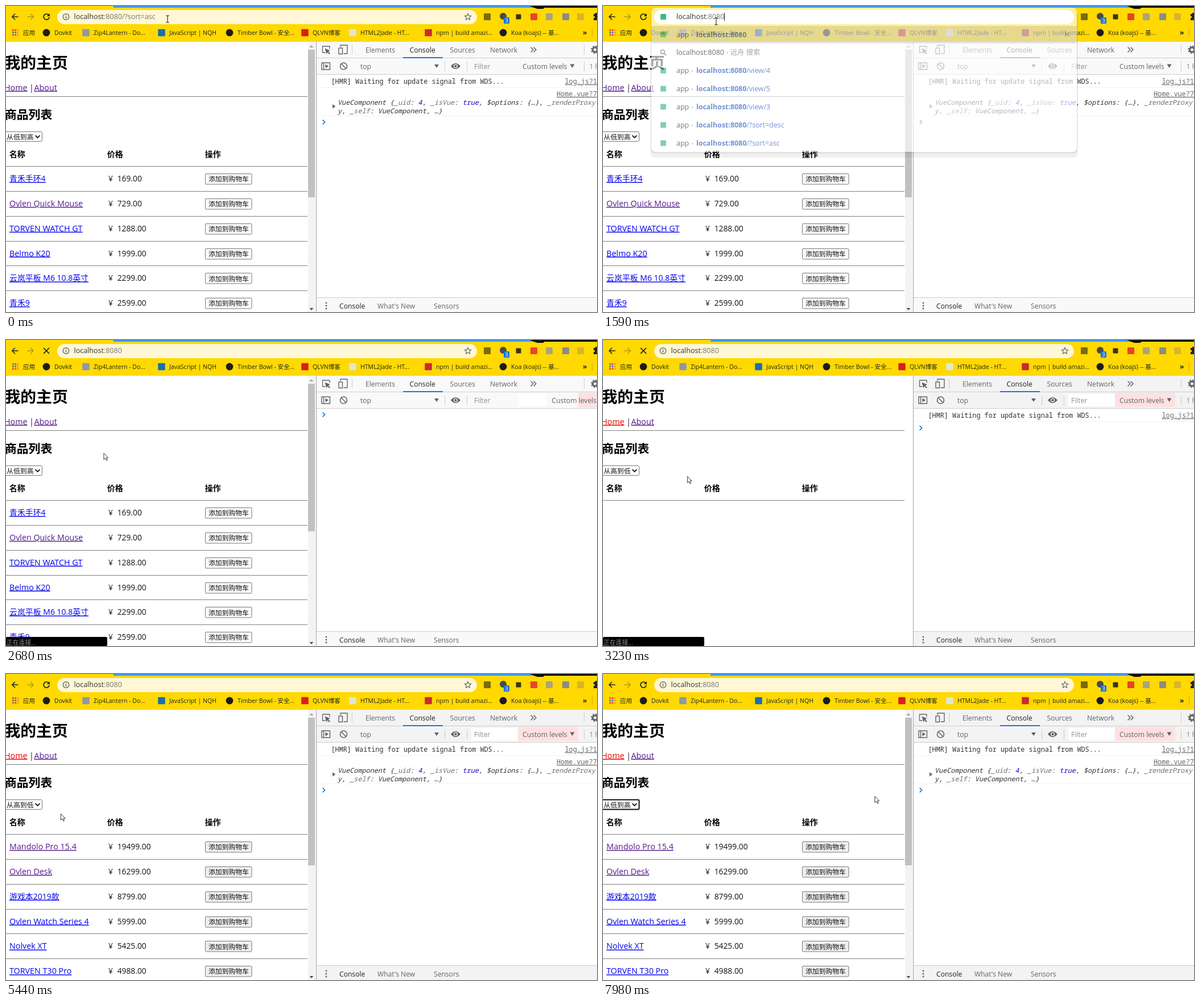
Recreate the animation shown at these times as an HTML page. Size 1039x539 px, loop 8000 ms.

```html
<!DOCTYPE html>
<html lang="zh-CN">
<head>
<meta charset="utf-8">
<title>商品列表</title>
<style>
html, body { margin: 0; width: 100%; height: 100%; overflow: hidden; background: #fff; }
svg { display: block; width: 1039px; height: 539px; }
text { font-family: "Open Sans", "Noto Sans CJK SC", "Noto Sans CJK JP", sans-serif; white-space: pre; }
.mono { font-family: "Noto Sans Mono", "DejaVu Sans Mono", monospace; }
.link { text-decoration: underline; }
.bold { font-weight: 700; }
.ital { font-style: italic; }
.line { fill: none; stroke-linecap: round; stroke-linejoin: round; }
</style>
</head>
<body>
<svg id="stage" viewBox="0 0 1039 539" xmlns="http://www.w3.org/2000/svg"></svg>
<script>
const LOOP = 8000;
const BLUE = '#0000ee', VISITED = '#551a8b', GREY = '#5f6368', ACCENT = '#1a73e8';
const RULE = '#808080', YELLOW = '#ffd900', PALE = '#fff7d6', ROW = 43.85;

const text = (x, y, size, fill, str, cls = '', id = '') =>
  `<text x="${x}" y="${y}" font-size="${size}" fill="${fill}" class="${cls}" id="${id}">${str}</text>`;
const rect = (x, y, w, h, fill, more = '') =>
  `<rect x="${x}" y="${y}" width="${w}" height="${h}" fill="${fill}" ${more}/>`;
const dot = (x, y, r, fill, more = '') => `<circle cx="${x}" cy="${y}" r="${r}" fill="${fill}" ${more}/>`;
const line = (d, stroke, w = 1, more = '') =>
  `<path class="line" d="${d}" stroke="${stroke}" stroke-width="${w}" ${more}/>`;
const shape = (d, fill, more = '') => `<path d="${d}" fill="${fill}" ${more}/>`;
const group = (id, body, more = '') => `<g id="${id}" ${more}>${body}</g>`;
const span = (fill, str, cls = '') => `<tspan fill="${fill}" class="${cls}">${str}</tspan>`;
const square = (x, y, s, fill) => rect(x - s / 2, y - s / 2, s, s, fill, 'rx="1"');

function toolbar() {
  let s = rect(0, 0, 1039, 63, YELLOW) + rect(189, 0, 850, 3, '#0c0c10') + rect(189, 0, 740, 3, '#3f9af0')
    + shape('M921 0H946V3Q946 5 942 5H934Q928 3 921 0Z', '#0c0c10');
  s += line('M21 19H11M15.5 14.3L10.8 19L15.5 23.7', '#222', 1.6);
  s += line('M38 19H48M43.5 14.3L48.2 19L43.5 23.7', '#b39a1c', 1.6);
  s += group('reload', line('M75 15.8A5 5 0 1 0 76 20.2', '#222', 1.7) + shape('M76.8 13V18H71.8Z', '#222'));
  s += group('stop', line('M66.6 14.5L75.4 23.3M75.4 14.5L66.6 23.3', '#222', 1.7));

  const icons = [[846, '#7b6a10'], [928, '#e8432e'], [955, '#a9a47e'], [984, '#8c8c84'], [1010, '#d8b52c']];
  s += icons.map(([x, c]) => square(x, 19, 12, c)).join('');
  s += dot(874, 18, 6, '#4a4a4a') + rect(875, 20, 10, 11, '#1b78d0', 'rx="1.5"') + text(877.4, 29, 9, '#fff', '3');
  s += square(901, 19, 9, '#3a3512');
  s += shape('M1033 14H1036V12H1039V25H1033V21H1035V18H1033Z', '#222');

  for (let i = 0; i < 9; i++)
    s += rect(11 + i % 3 * 4.2, 41 + (i / 3 | 0) * 4.2, 2.9, 2.9, ['#e8453c', '#e8453c', '#f39b1f', '#2f9c58', '#3c7fe0', '#f39b1f'][i % 6]);
  const marks = [
    [85, 'Dovkit', '#1c1c1c', 1], [154, 'Zip4Lantern - Do...', '#8f98a3'],
    [287, 'JavaScript | NQH', '#1a6fb0'], [407, 'Timber Bowl - 安全...', '#1c1c1c', 1],
    [539, 'QLVN博客', '#d81e1e'], [623, 'HTML2Jade - HT...', '#dfe7d2'],
    [756, 'npm | build amazi...', '#cb2a32'], [888, 'Koa (koajs) -- 基...', '#1c1c1c', 1]];
  s += text(30, 51, 10.5, '#222', '应用');
  for (const [x, label, c, round] of marks)
    s += (round ? dot(x - 14, 47, 6.4, c) : square(x - 13.5, 47, 12.5, c)) + text(x, 51, 10.55, '#222', label);
  return s + text(1014, 50.5, 12, '#222', '»', 'bold') + rect(1030, 40, 1, 14, '#c9aa08');
}

const table = (id, rows) => group(id, rows.map(([name, price, seen, size = 14.3], i) => {
  const y = 309 + i * ROW, top = Math.round(y) - 13.5;
  return text(6, y, size, seen ? VISITED : BLUE, name, 'link') + text(180, y, 13.8, '#111', '¥')
    + text(195.7, y, 13.8, '#111', price)
    + rect(350.5, top, 81.5, 18.5, id == 'asc' ? '#fafafa' : '#efefef', 'rx="1.5" stroke="#777"')
    + text(356, y + .2, 11.8, '#111', '添加到购物车')
    + (i ? rect(0, Math.round(282 + i * ROW), 530, 1, RULE) : '');
}).join(''));

function page() {
  const head = text(-2.5, 110, 27.8, '#000', '我的主页', 'bold')
    + text(-3, 148.5, 14.3, VISITED, 'Home', 'link', 'home') + text(41, 148.5, 14.3, '#222', '|')
    + text(49.5, 148.5, 14.3, VISITED, 'About', 'link') + rect(0, 159, 530, 1, RULE)
    + text(-2, 198.5, 20.8, '#000', '商品列表', 'bold')
    + rect(-6, 221.5, 69.5, 17, '#fff', 'id="box" rx="2"')
    + text(1, 234.5, 11.9, '#111', '', '', 'choice') + line('M52 228.5L55.5 232L59 228.5', '#222', 1.8)
    + ['名称', '价格', '操作'].map((h, i) => text(5.8 + 172 * i, 266, 14, '#000', h, 'bold')).join('')
    + rect(0, 282, 530, 1, RULE);
  const bar = rect(531, 63, 13, 476, '#f3f3f3') + rect(531, 77, 12, 260, '#c1c1c1')
    + shape('M533.5 73L537 69L540.5 73Z', '#a3a3a3') + shape('M533.5 532L537 536L540.5 532Z', '#505050');
  return group('head', head) + group('list', bar
    + table('asc', [['青禾手环4', '169.00', 0, 13.9], ['Ovlen Quick Mouse', '729.00', 1],
      ['TORVEN WATCH GT', '1288.00'], ['Belmo K20', '1999.00'],
      ['云岚平板 M6 10.8英寸', '2299.00', 0, 13.95], ['青禾9', '2599.00', 0, 13.9]])
    + table('desc', [['Mandolo Pro 15.4', '19499.00', 1], ['Ovlen Desk', '16299.00', 1],
      ['游戏本2019款', '8799.00', 0, 13.95], ['Ovlen Watch Series 4', '5999.00'],
      ['Nolvek XT', '5425.00'], ['TORVEN T30 Pro', '4988.00']]));
}

function devtools() {
  let s = rect(545, 63, 494, 476, '#fff') + rect(546, 63, 493, 57, '#f3f3f3', 'id="bars"')
    + rect(546, 514, 493, 25, '#f3f3f3', 'id="drawer"')
    + rect(545, 63, 1, 476, '#a0a0a0') + rect(546, 91, 493, 1, '#ccc') + rect(546, 120, 493, 1, '#ccc')
    + rect(546, 513, 493, 1, '#ccc');
  s += line('M561 82H556.5V71H569V75', GREY, 1.3) + shape('M560.5 74.5L570 78.5L566.5 80L570 83.5L568.5 85L565 81.5L563.5 85Z', GREY);
  s += line('M588 71.5V69H600V84H594', GREY, 1.4) + line('M585 74H591.5V84.5H585Z', GREY, 1.4);
  s += rect(608, 68, 1, 17, '#ccc') + rect(1016, 68, 1, 17, '#ccc');
  [[632, 'Elements'], [709.5, 'Console'], [780.5, 'Sources'], [851, 'Network']]
    .forEach(([x, str]) => s += text(x, 81.5, 12.1, x == 709.5 ? '#222' : GREY, str));
  s += rect(698, 90, 70, 2, ACCENT) + line('M923 73L927 77L923 81M928 73L932 77L928 81', GREY, 1.6);
  s += dot(1035.5, 77, 4, 'none', `stroke="${GREY}" stroke-width="3"`)
    + dot(1035.5, 77, 6.3, 'none', `stroke="${GREY}" stroke-width="2" stroke-dasharray="2.5 2.45"`);
  s += line('M555 100H569.5V112H555ZM558.5 100V112', GREY, 1.4) + shape('M561.5 102.5L567 106L561.5 109.5Z', GREY);
  s += dot(593.5, 106, 6, 'none', `stroke="${GREY}" stroke-width="1.6"`) + line('M589.3 101.8L597.7 110.2', GREY, 1.6);
  s += text(623, 110.5, 12.1, GREY, 'top') + shape('M753 103H761L757 109Z', GREY);
  s += rect(771, 98, 1, 17, '#ccc') + rect(810, 98, 1, 17, '#ccc');
  s += shape('M782 106Q790 96 799 106Q790 116 782 106Z', GREY) + dot(790.5, 106, 3.6, '#f3f3f3') + dot(790.5, 106, 2.2, GREY);
  s += group('field', rect(818, 95, 81, 22, '#fff')) + text(823, 110.5, 12.1, '#8a8d91', 'Filter');
  s += group('levels', rect(901, 93, 105, 25, '#fde1e0', 'id="pink"') + text(908, 110.5, 12.2, GREY, 'Custom levels')
    + shape('M991.5 102.5H999.5L995.5 109Z', GREY));
  s += group('hidden', rect(1016, 98, 1, 17, '#ccc') + text(1025.5, 110.5, 12.1, '#888', '1 hidden'));
  s += group('hint', rect(902, 95, 48, 22, '#fff') + rect(1006, 93, 33, 26, '#fde1e0') + text(959.5, 110.5, 12.2, GREY, 'Custom levels'));
  s += [523, 528, 533].map(y => dot(563, y, 1.4, GREY)).join('');
  [[586, 'Console', '#222'], [653, "What's New", GREY], [752, 'Sensors', GREY]]
    .forEach(([x, str, c]) => s += text(x, 532.5, 12.1, c, str));

  const key = str => span('#6e6e6e', str);
  const num = str => span('#1c00cf', str);
  s += group('log1', text(571.5, 137, 11.8, '#303030', '[HMR] Waiting for update signal from WDS...', 'mono')
    + text(982.5, 137, 11.8, '#666', 'log.js?1afd', 'mono link') + rect(546, 143, 493, 1, '#f2f2f2'));
  s += group('log2', text(968, 159, 11.8, '#666', 'Home.vue?76f2', 'mono link')
    + shape('M574 173L579.5 176.8L574 180.6Z', '#6e6e6e')
    + text(583, 174, 11.8, '#303030', 'VueComponent {' + key('_uid') + ': ' + num('4') + ', ' + key('_isVue') + ': '
      + num('true') + ', $options: {…}, ' + key('_renderProxy'), 'mono ital')
    + text(583, 188.5, 11.8, '#303030', 'y, ' + key('_self') + ': VueComponent, …}', 'mono ital')
    + rect(546, 193, 493, 1, '#f2f2f2'));
  return s + group('prompt', line('M557.2 -3.4L560.6 0L557.2 3.4', ACCENT, 1.7));
}

function popup() {
  const y = i => 54.5 + 31.9 * i;
  let s = rect(83, 9, 752, 258, '#000', 'rx="9" opacity=".09"') + rect(84, 5, 750, 255, '#000', 'rx="8" opacity=".1"')
    + rect(85, 3, 748, 254, '#fff', 'rx="8"') + rect(85, 35, 748, 31, '#d9d9d9');
  s += dot(104.8, 80.8, 3.4, 'none', `stroke="${GREY}" stroke-width="1.4"`) + line('M107.5 83.5L110.8 86.8', GREY, 1.5)
    + text(129, y(1), 12.45, '#222', 'localhost:8080') + text(216.5, y(1), 12.4, '#777', '- 远舟 搜索');
  const paths = ['', '/view/4', '/view/5', '/view/3', '/?sort=desc', '/?sort=asc'];
  paths.forEach((path, i) => {
    const base = y(i && i + 1);
    s += square(106, base - 4.5, 10, '#41b883') + text(129, base, 12.5, '#333', 'app') + text(155, base, 12.5, '#777', '-')
      + text(164, base, 12.4, '#2a5bbf', span('#2a5bbf', 'localhost:8080', 'bold') + path);
  });
  return s + line('M812.5 46.7L818.9 53.1M818.9 46.7L812.5 53.1', '#777', 1.4);
}

const stage = document.getElementById('stage');
stage.innerHTML = '<defs><clipPath id="cut"><rect id="cutBox" y="8" height="22"/></clipPath></defs>'
  + rect(0, 0, 1039, 539, '#fff') + page() + devtools() + toolbar()
  + group('popup', popup())
  + rect(90, 7, 738, 25, PALE, 'rx="12.5" id="pill"')
  + group('info', dot(105.5, 19, 5.3, 'none', `stroke="${GREY}" stroke-width="1.3"`) + rect(104.8, 18, 1.4, 4, GREY) + rect(104.8, 15.6, 1.4, 1.5, GREY))
  + group('favicon', square(106, 19, 10, '#41b883'))
  + group('star', line('M812 13.2L813.6 17.1L817.8 17.4L814.6 20.1L815.6 24.2L812 22L808.4 24.2L809.4 20.1L806.2 17.4L810.4 17.1Z', GREY, 1.2))
  + text(119.5, 23.3, 12.5, '#333', '', '', 'url') + rect(213, 12, 1, 14, '#222', 'id="caret"')
  + group('picked', rect(0, 11, 500, 16, '#0078d7') + text(119.5, 23.3, 12.5, '#fff', 'localhost:8080/?sort=asc'), 'clip-path="url(#cut)"')
  + group('menu', rect(1, 241, 64, 32, '#000', 'opacity=".18"') + rect(-1, 239.5, 63.5, 30.5, '#fff', 'stroke="#555"')
    + rect(-1, 0, 63, 15, '#1e90ff', 'id="hover" stroke="#111" stroke-width="1.4"')
    + text(1, 250.8, 11.8, '#111', '从高到低', '', 'opt0') + text(1, 266.3, 11.8, '#111', '从低到高', '', 'opt1'))
  + group('status', rect(0, 523, 178, 16, '#000', 'rx="2"') + text(1, 536.5, 10.8, '#8d8d8d', '正在连接...'))
  + group('beam', line('M-2.5 -6H-.6Q0 -6 0 -5.4Q0 -6 .6 -6H2.5M0 -5.4V5.4M-2.5 6H-.6Q0 6 0 5.4Q0 6 .6 6H2.5', '#222', 1.1))
  + group('arrow', shape('M.4 .4V11.4L3 9L4.9 13.2L6.6 12.4L4.8 8.3H8.2Z', '#fff', 'stroke="#222" stroke-width=".9"'));

const el = id => document.getElementById(id);
const set = (id, name, value) => el(id).setAttribute(name, value);
const show = (id, on) => { el(id).style.display = on ? '' : 'none'; };
const move = (id, x, y) => set(id, 'transform', `translate(${x} ${y})`);

// The last entry whose time has passed.
const at = (track, t) => track.filter(k => k[0] <= t).pop();

// Pointer places: time, x, y
const pointer = [
  [0, 284, 23], [150, 276, 23], [270, 266, 24], [420, 255, 26], [540, 236, 28], [660, 219, 28], [820, 212, 28],
  [960, 208, 27], [1080, 204, 27], [1200, 199, 27], [1870, 200.5, 30], [2140, 198, 80], [2260, 194, 140],
  [2410, 190, 175], [2530, 184, 192], [2680, 171.5, 199], [2950, 150, 227], [3230, 148, 240],
  [3510, 144, 248], [3780, 140, 252], [4060, 138.5, 253], [4890, 140.5, 257], [5040, 143, 260], [5320, 122, 253],
  [5440, 96, 246], [5570, 79, 240], [5710, 64, 235], [5830, 52, 230], [6100, 47, 236], [6220, 43, 245],
  [6340, 41, 252], [6460, 39.5, 256], [7450, 79, 235], [7590, 70, 235], [7710, 58, 235], [7830, 49, 235], [7980, 477.5, 215]];
const fade = [[0, 0], [1470, .2], [1590, .65], [1720, 1], [1990, .35], [2140, 0]];

function render(t) {
  const within = (a, b) => t >= a && t < b;
  const [, x, y] = at(pointer, t);
  const fresh = t >= 2800;

  // address bar
  const typing = within(1470, 1870), focus = within(150, 1870);
  set('pill', 'fill', focus ? '#fff' : PALE);
  set('url', 'x', typing ? 129 : 119.5);
  el('url').innerHTML = 'localhost' + span('#777', ':8080' + (t < 1470 ? '/?sort=asc' : ''));
  show('caret', typing);
  show('favicon', typing);
  show('info', !typing);
  show('star', !typing);
  const all = within(150, 270), from = all ? 120 : Math.max(203, x);
  show('picked', all || within(420, 1470));
  set('cutBox', 'x', from);
  set('cutBox', 'width', Math.max(0, 263 - from));
  set('popup', 'opacity', at(fade, t)[1]);
  const loading = within(1870, 3510);
  show('stop', loading);
  show('reload', !loading);

  // shop page
  show('head', !within(2800, 3230));
  show('list', !within(2800, 3510));
  show('asc', !fresh);
  show('desc', fresh);
  set('home', 'fill', fresh ? '#ee0000' : VISITED);
  const chosen = t >= 6730;
  el('choice').textContent = fresh && !chosen ? '从高到低' : '从低到高';
  set('box', 'stroke', chosen ? '#101010' : '#767676');
  set('box', 'stroke-width', chosen ? 2 : 1);
  const low = t >= 6340;
  show('menu', within(5950, 6730));
  set('hover', 'y', low ? 254.8 : 239.5);
  set('opt0', 'fill', low ? '#111' : '#fff');
  set('opt1', 'fill', low ? '#fff' : '#111');
  show('status', within(2260, 4060));

  // console
  const cleared = within(2410, 2800);
  set('bars', 'fill', fresh ? '#f3f3f3' : '#f9f9f9');
  set('drawer', 'fill', fresh ? '#f3f3f3' : '#f9f9f9');
  show('field', fresh);
  show('pink', fresh);
  show('levels', !cleared);
  show('hidden', !cleared);
  show('hint', cleared);
  const first = t < 2410 || t >= 2950, second = t < 2410 || t >= 3780;
  show('log1', first);
  show('log2', second);
  move('prompt', 0, second ? 204.5 : first ? 155 : 131.5);

  // pointer
  show('beam', t < 1870);
  show('arrow', t >= 1870);
  move('beam', x, y);
  move('arrow', x, y);
}

function tick() {
  render(performance.now() % LOOP);
  requestAnimationFrame(tick);
}
tick();
</script>
</body>
</html>
```
